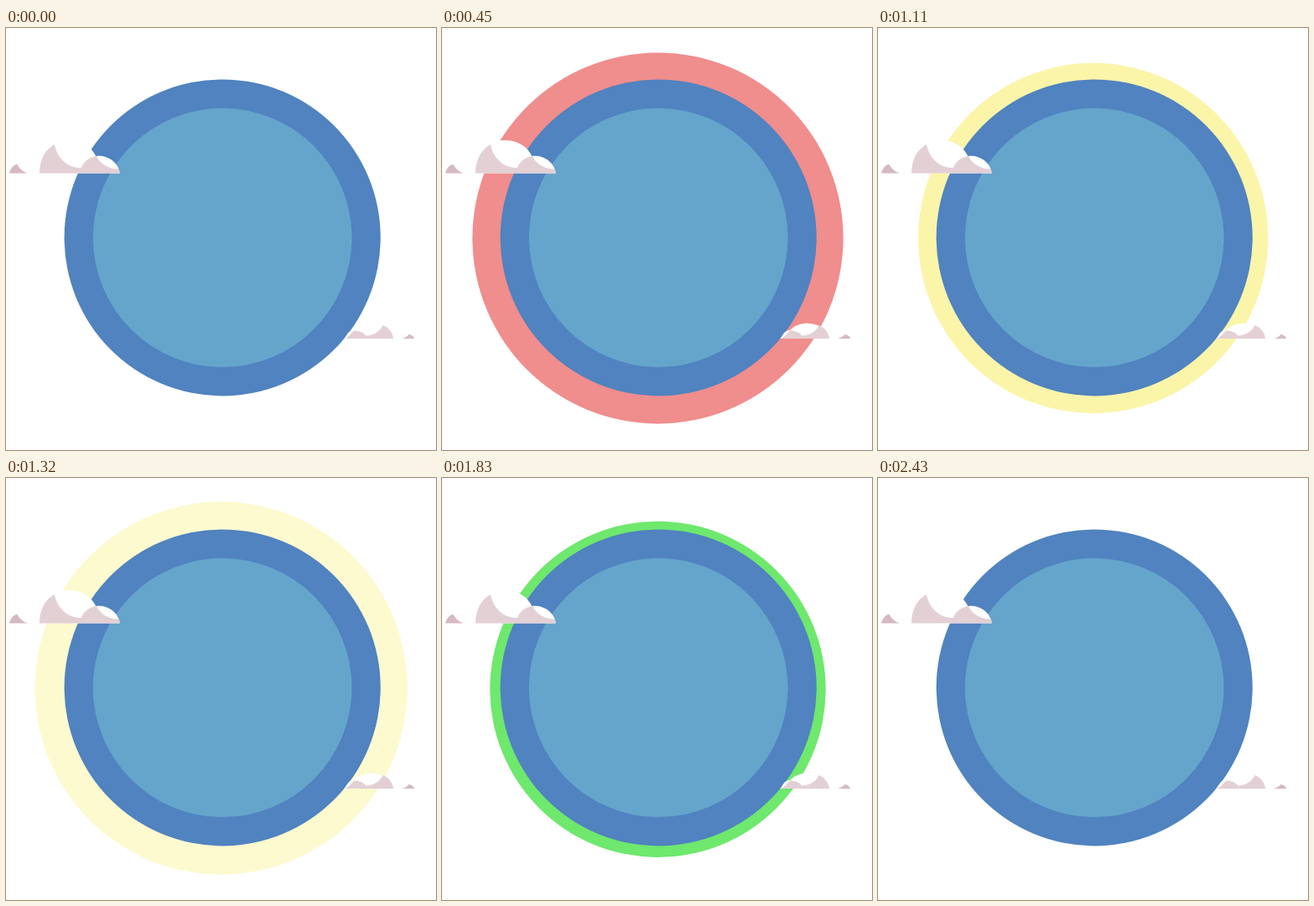
Write an HTML page that moves like this. It is 514 px wide and 504 px high and loops after 2.64 s.

```html
<!DOCTYPE html>
<html lang="en">
<head>
<meta charset="utf-8">
<title>Pulsing circle</title>
<style>
  html, body { margin: 0; width: 100%; height: 100%; overflow: hidden; background: #fff; }
  svg { display: block; width: 100%; height: 100%; }
</style>
</head>
<body>
<svg viewBox="0 0 514 504">
  <defs>
    <g id="puff">
      <path fill="#fff" d="M4 0C5-5 8-9 13-11C20-15 32-14 41-12V0Z"/>
      <path fill="#d5b9c4" d="M4 0C5-5 8-9 13-11C16-6 20-2 26 0Z"/>
    </g>
  </defs>
  <circle class="pulse" cx="258" cy="251" fill="#e74141"/>
  <circle class="pulse" cx="257.2" cy="251" fill="#fbf49c"/>
  <circle class="pulse" cx="258" cy="252.3" fill="#6ee86d"/>
  <circle cx="258.7" cy="250.4" r="189" fill="#5083bf"/>
  <circle cx="258.7" cy="250.4" r="154.700" fill="#65a5cc"/>

  <use href="#puff" transform="translate(0 173.5)"/>
  <g transform="translate(0 173.5)">
    <path fill="#fff" d="M40 0V-8C43-27 57-40 76-39.5C91-39 102-32 107.5-20.5C121-22 134-14 136 0Z"/>
    <path fill="#e3d0d5" d="M40 0C40-15 46-28 58-34.5C61-18 74-6 90-6.5C93-14 99-19 108-20.5C113-11 122-5 135-5L136 0Z"/>
  </g>

  <use href="#puff" transform="translate(491 371) scale(-.7 .48)"/>
  <path fill="#fff" d="M404.5 371C407 367 409 363 412.5 361.5L416 361C421 355 429 352.7 437 352.7C447 352.7 460 358 463 367V371Z"/>
  <path fill="#e3d0d5" d="M405.5 371C411 368 413 364 416 361.5C423 361.5 428 364 430 367.5C439 367 447 363 450.5 355C457 357.5 462 363 463 371Z"/>
</svg>
<script>
const LOOP = 2640, STEP = 30, START_RADIUS = 186;
const circles = document.querySelectorAll('.pulse');

// Times in ms; each pulse grows over its life and fades out at the end of it
const pulses = [
  { start: 0, life: 720, growth: 57, power: 1, fade: 450 },
  { start: 750, life: 840, growth: 54, power: 1, fade: 560 },
  { start: 1440, life: 990, growth: 47, power: 1.25, fade: 430 }
];

function drawPulse({ start, life, growth, power, fade }, circle, t) {
  const age = t - start;
  const alive = age >= 0 && age < life;
  circle.setAttribute('r', alive ? START_RADIUS + growth * (age / life) ** power : 0);
  circle.setAttribute('opacity', alive ? Math.min(1, (life - age) / fade) : 0);
}

function draw() {
  const t = Math.floor(performance.now() % LOOP / STEP) * STEP;
  pulses.forEach((pulse, i) => drawPulse(pulse, circles[i], t));
  requestAnimationFrame(draw);
}
draw();
</script>
</body>
</html>
```
